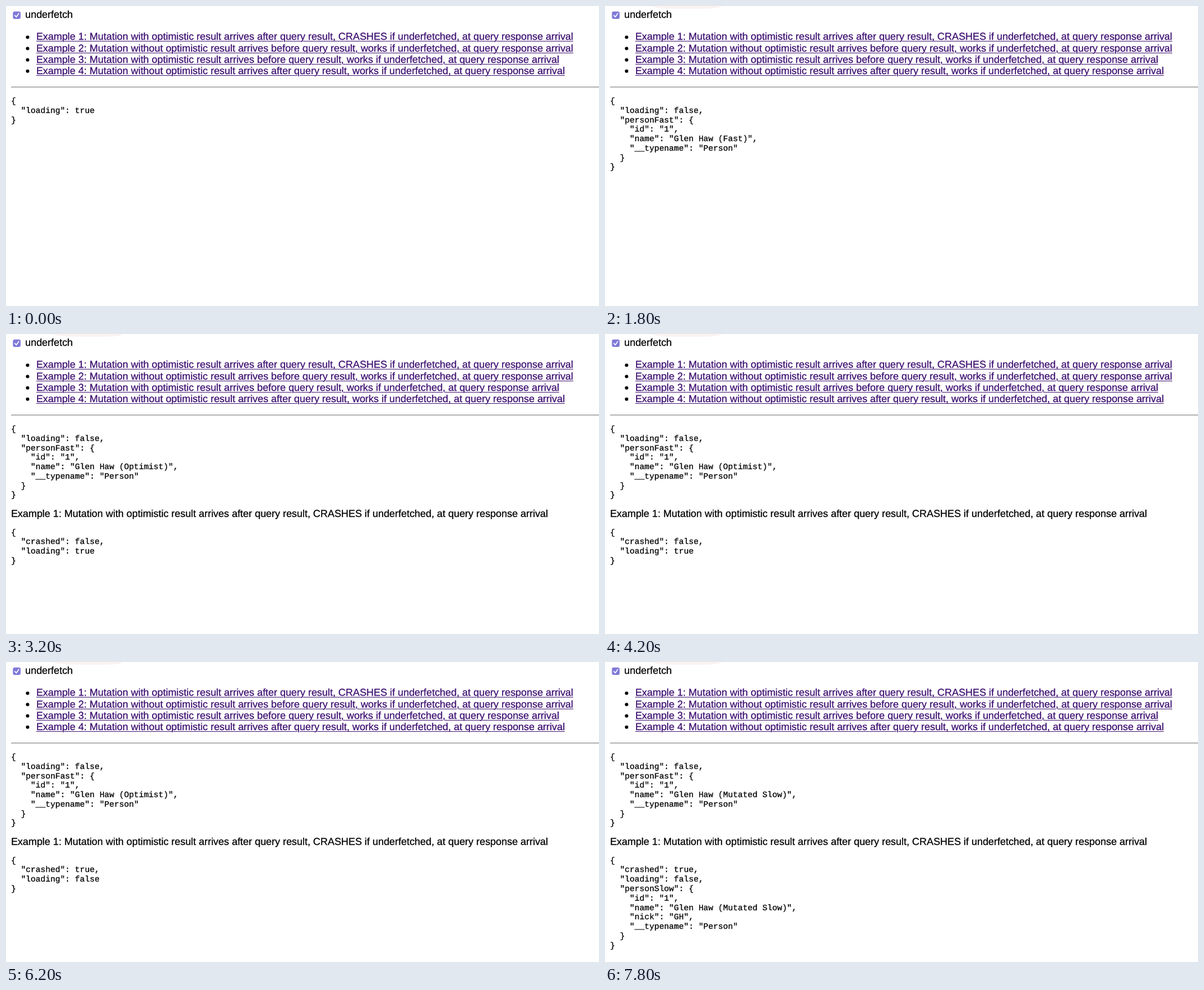
Animation, 1052 px wide and 533 px high, one loop 8 s. Source, as an HTML page:

```html
<!DOCTYPE html>
<html lang="en">
<head>
<meta charset="utf-8">
<title>underfetch</title>
<style>
html, body { margin: 0; width: 100%; height: 100%; overflow: hidden; background: #fff; }
#stage {
  position: relative; width: 1052px; height: 533px; overflow: hidden; color: #000;
  text-rendering: geometricPrecision; font-kerning: none; -webkit-text-stroke: 0.3px;
}
#stage > * { position: absolute; margin: 0; white-space: pre; }
svg { left: 0; top: 0; }
.sans { font: 17.908px/20px "Liberation Sans", Arial, sans-serif; font-kerning: none; }
.link {
  left: 53.7px; color: #3c0f70; text-decoration: underline;
  text-decoration-thickness: 1.3px; text-underline-offset: 1.5px;
}
pre { left: 8.95px; font: 14.542px/16.78px "Liberation Mono", "Courier New", monospace; }
</style>
</head>
<body>
<div id="stage">
  <svg width="1052" height="533" viewBox="0 0 1052 533">
    <path id="glow" d="M79 0C90 3.5 110 5 130 5H165C188 5 203 4 208 0Z" fill="#faf3f0"/>
    <rect x="12.3" y="9.7" width="13.6" height="13.4" rx="3" fill="#8179d9"/>
    <path d="M15.8 16.7L18.2 19.4L22.6 13.2" fill="none" stroke="#fff" stroke-width="1.7" stroke-linecap="round" stroke-linejoin="round"/>
    <g id="dots"></g>
    <rect x="9" y="143.2" width="1043" height="1.4" fill="#909090"/>
    <rect x="9" y="144.6" width="1043" height="1" fill="#ddd"/>
  </svg>
  <div class="sans" style="left:34px;top:5px">underfetch</div>
  <pre id="fast" style="top:162px"></pre>
  <div id="title" class="sans" style="left:8.95px;top:309px"></div>
  <pre id="slow" style="top:345.6px"></pre>
</div>
<script>
const LOOP = 8000;
const NAME = "Glen Haw", NICK = "GH";
const stage = document.getElementById("stage");
const el = id => document.getElementById(id);
const json = data => JSON.stringify(data, null, 2);

const examples = [
  ["with", "after", "CRASHES"],
  ["without", "before", "works"],
  ["with", "before", "works"],
  ["without", "after", "works"]
].map(([how, when, what], i) =>
  `Example ${i + 1}: Mutation ${how} optimistic result arrives ${when} query result, ` +
  `${what} if underfetched, at query response arrival`);

examples.forEach((text, i) => {
  const link = document.createElement("div");
  link.className = "sans link";
  link.style.top = 44.45 + i * 20.13 + "px";
  link.textContent = text;
  stage.append(link);
  const dot = document.createElementNS("http://www.w3.org/2000/svg", "circle");
  dot.setAttribute("cx", 38.3);
  dot.setAttribute("cy", 55.4 + i * 20.13);
  dot.setAttribute("r", 3);
  el("dots").append(dot);
});

function fastData(t) {
  if (t < 200) return { loading: true };
  const tag = t < 2000 ? "Fast" : t < 7000 ? "Optimist" : "Mutated Slow";
  return {
    loading: false,
    personFast: { id: "1", name: `${NAME} (${tag})`, __typename: "Person" }
  };
}

function slowData(t) {
  if (t < 5200) return { crashed: false, loading: true };
  const data = { crashed: true, loading: false };
  if (t >= 7000) {
    data.personSlow = { id: "1", name: `${NAME} (Mutated Slow)`, nick: NICK, __typename: "Person" };
  }
  return data;
}

function setText(id, text) {
  const node = el(id);
  if (node.textContent !== text) node.textContent = text;
}

function draw(t) {
  const opened = t >= 2000;
  el("glow").style.display = t >= 1800 ? "" : "none";
  setText("fast", json(fastData(t)));
  setText("title", opened ? examples[0] : "");
  setText("slow", opened ? json(slowData(t)) : "");
}

const start = performance.now();
function tick(now) {
  draw(Math.max(0, now - start) % LOOP);
  requestAnimationFrame(tick);
}
draw(0);
requestAnimationFrame(tick);
</script>
</body>
</html>
```
